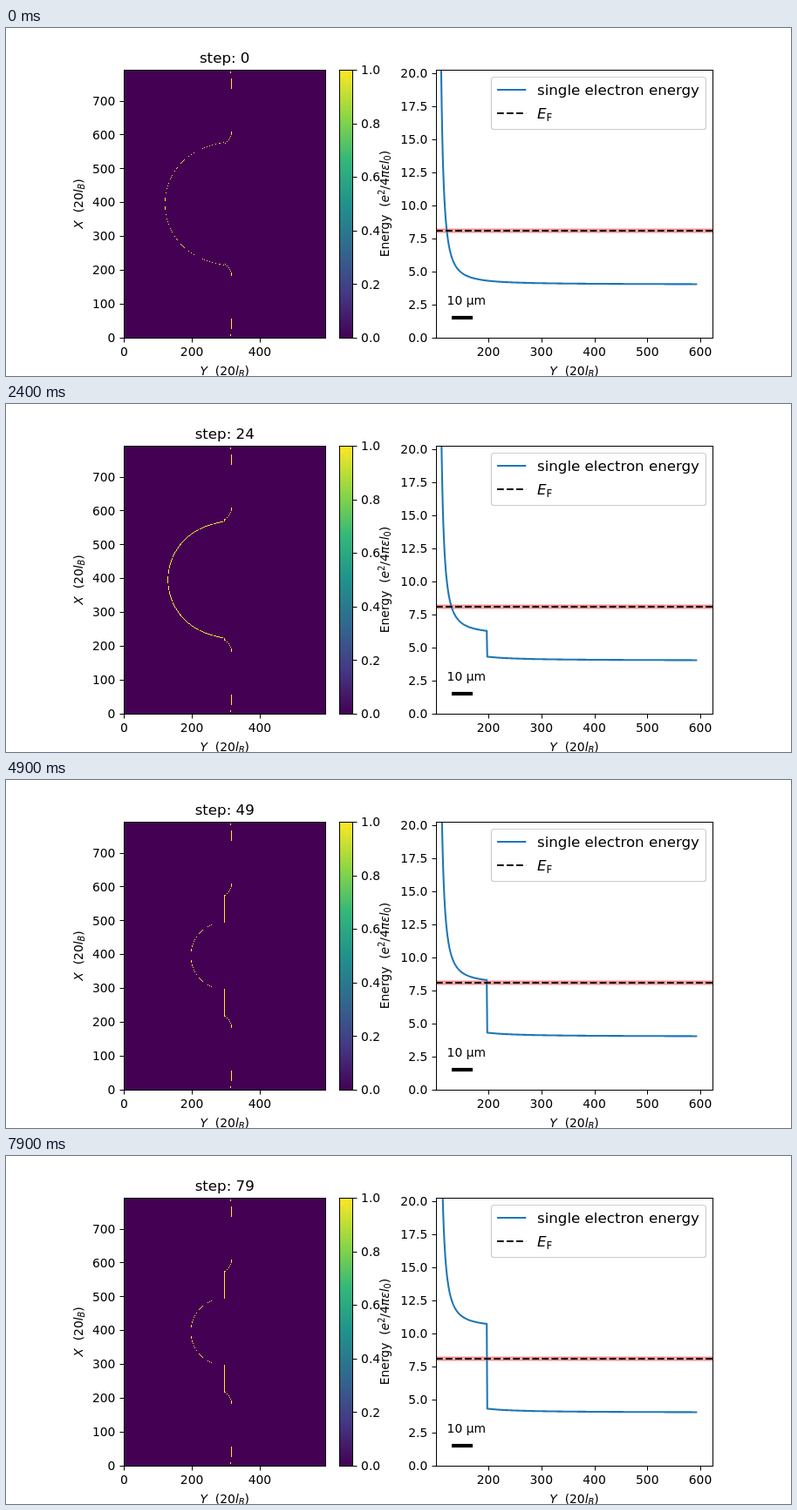
An HTML page with a canvas for the animation above (8000 ms loop, 900x400 px).

```html
<!DOCTYPE html>
<html lang="en">
<head>
<meta charset="utf-8">
<title>Energy contour</title>
<style>
  html, body { margin: 0; width: 100%; height: 100%; overflow: hidden; background: #fff; }
  canvas { position: absolute; left: 135px; top: 48px; }
  svg { position: absolute; left: 0; top: 0; }
  text { font: 13.89px "DejaVu Sans", sans-serif; white-space: pre; }
  .big { font-size: 16.67px; }
  .i { font-style: oblique; }
  .s { font-size: 70%; }
</style>
</head>
<body>
<canvas id="map" width="231" height="308"></canvas>
<svg id="plot" width="900" height="400" viewBox="0 0 900 400">
  <defs>
    <linearGradient id="viridis" x1="0" y1="1" x2="0" y2="0"></linearGradient>
    <clipPath id="clip"><rect x="493" y="48" width="317" height="308"/></clipPath>
  </defs>
</svg>
<script>
const STEPS = 80, STEP_MS = 100, GAIN = 0.081;
const FERMI = 8.08, HALF = 0.13;
const EDGE = 198, CX = 250.5, CY = 202, RADIUS = 38.5, SCALE = 308 / 792;
const svg = document.getElementById("plot");

function add(tag, attrs, html = "") {
  const el = document.createElementNS("http://www.w3.org/2000/svg", tag);
  for (const k in attrs) el.setAttribute(k, attrs[k]);
  el.innerHTML = html;
  svg.append(el);
  return el;
}
const label = (x, y, html, anchor = "middle", extra = {}) =>
  add("text", { x, y, "text-anchor": anchor, ...extra }, html);
const path = (d, width = 1, stroke = "#000", extra = {}) =>
  add("path", { d, fill: "none", stroke, "stroke-width": width, ...extra });
const frame = (x, y, w, h, fill = "none") =>
  add("rect", { x: x + 0.5, y: y + 0.5, width: w, height: h, fill, stroke: "#000" });

// Ticks sit on whole pixels, and so do the baselines of their labels.
const snap = v => Math.round(v) + 0.5;
const PAD = 9.72;
function xTick(x, text) {
  path(`M${snap(x)} 356.5v5`);
  label(x, 377, text);
}
function yTick(x, y, text, dir = -1) {
  path(`M${snap(x)} ${snap(y)}h${5 * dir}`);
  label(x + PAD * dir, Math.round(y + 5.2), text, dir < 0 ? "end" : "start");
}

// Energy of the unbiased state, falling off from the gate at Y = 101.3
function energy(u) {
  const q = Math.max(u - 101.3, 1);
  return 4.01 + 1382 / q ** 2 + 14.7 / q;
}

// Left axes
const title = label(250.7, 40, "", "middle", { class: "big" });
frame(135, 48, 231, 308);
for (let v = 0; v <= 400; v += 200) xTick(135.33 + v * SCALE, v);
for (let v = 0; v <= 700; v += 100) yTick(135.14, 355.8 - v * SCALE, v);
const unit = '\u00a0\u00a0(20<tspan class="i">l</tspan><tspan class="i s" dy="2.2">B</tspan><tspan dy="-2.2">)</tspan>';
const axisName = n => `<tspan class="i">${n}</tspan>${unit}`;
const turned = (x, html) => label(0, 0, html, "middle", { transform: `translate(${x} 202) rotate(-90)` });
label(250.7, 399, axisName("Y"));
turned(88, axisName("X"));

// Colour bar
document.getElementById("viridis").innerHTML =
  ["#440154", "#443983", "#31688e", "#21918c", "#35b779", "#90d743", "#fde725"]
    .map((c, i) => `<stop offset="${i / 6}" stop-color="${c}"/>`).join("");
frame(382, 48, 15, 308, "url(#viridis)");
for (let i = 0; i <= 5; i++) yTick(397.4, 356 - i * 61.6, (i / 5).toFixed(1), 1);

// Right axes
const px = u => 553 + (u - 200) * 0.6075;
const py = e => 356 - e * 15.22;
const BLUE = "#1f77b4", DASH = { "stroke-dasharray": "7.71 3.33" };
const clipped = { "clip-path": "url(#clip)" };
add("rect", { x: 493, y: py(FERMI + HALF), width: 317, height: 2 * HALF * 15.22,
  fill: "#f00", "fill-opacity": 0.3, stroke: "#f00", "stroke-opacity": 0.3,
  "stroke-width": 1.39, ...clipped });
const curve = path("", 2.08, BLUE, { ...clipped, "stroke-linejoin": "round" });
path("M493 233H810", 2.08, "#000", { ...DASH, ...clipped });
path("M511 333H535", 4.17);
label(527.8, 318, "10 μm");
frame(493, 48, 317, 308);
for (let v = 200; v <= 600; v += 100) xTick(px(v), v);
for (let v = 0; v <= 20; v += 2.5) yTick(492.95, py(v), v.toFixed(1));
label(651.5, 399, axisName("Y"));
turned(439, 'Energy\u00a0\u00a0(<tspan class="i">e</tspan><tspan class="s" dy="-5.3">2</tspan><tspan dy="5.3">/4</tspan>' +
  '<tspan class="i">πεl</tspan><tspan class="s" dy="2.2">0</tspan><tspan dy="-2.2">)</tspan>');

// Legend
add("rect", { x: 556.5, y: 56.5, width: 246, height: 60, rx: 3.3,
  fill: "#fff", "fill-opacity": 0.8, stroke: "#ccc", "stroke-width": 1.2 });
path("M563 71H596.3", 2.08, BLUE);
path("M563 98H596.3", 2.08, "#000", DASH);
label(609, 77, "single electron energy", "start", { class: "big" });
label(609, 104, '<tspan class="i">E</tspan><tspan class="s" dy="2.6">F</tspan>', "start", { class: "big" });

// Map
const ctx = document.getElementById("map").getContext("2d");
const dot = (x, y, h = 1) => ctx.fillRect(x - 135, y - 48, 1, h);
function pair(x, y, h = 1) {
  dot(x, y, h);
  dot(x, 2 * CY - y - h, h);
}

// Channel edge: a broken line at Y = 316 that bends in towards the gate.
function drawChannel() {
  pair(257, 50, 2);
  pair(258, 58, 12);
  for (let j = 0; j <= 13; j++) {
    if (j < 4 || j % 2) pair(Math.round(258 - 7 * (j / 13) ** 2), 119 + j);
  }
}

// Thin circular edge: only rows whose crossing falls mid-pixel show up.
function drawRim() {
  for (let dy = 0.5; dy < RADIUS - 1; dy++) {
    const x = CX - Math.sqrt(RADIUS ** 2 - dy ** 2), part = x % 1;
    if (part > 0.38 && part < 0.78) pair(Math.floor(x), CY - dy - 0.5);
  }
}

// Unbiased energy at every pixel outside the circle, left of the gate line.
const field = [];
for (let x = 178; x <= 250; x++) {
  for (let y = 128; y <= 275; y++) {
    const dx = CX - x - 0.5, dy = Math.abs(y + 0.5 - CY);
    const r = Math.hypot(dx, dy);
    if (r < RADIUS) continue;
    const flare = 2.5 * (1 - dx / r) ** 6;
    const u = 297 - Math.hypot(dx, dy - flare) / SCALE;
    field.push({ x, y, dy, e: energy(Math.min(u, EDGE)) });
  }
}

function drawMap(shift) {
  ctx.fillStyle = "#440154";
  ctx.fillRect(0, 0, 231, 308);
  ctx.fillStyle = "#fde725";
  drawChannel();
  const low = FERMI - HALF - shift, high = FERMI + HALF - shift;
  for (const { x, y, dy, e } of field) {
    const onLine = x === 250 && dy < 69.6;
    if (e > low && (e < high || onLine)) dot(x, y);
  }
  if (energy(EDGE) > low) drawRim();
}

function drawCurve(shift) {
  const pts = [];
  for (let u = 108; u <= 594; u++) {
    const e = energy(u) + (u < EDGE ? shift : 0);
    pts.push(px(u).toFixed(2) + " " + py(e).toFixed(2));
  }
  curve.setAttribute("d", "M" + pts.join("L"));
}

const start = performance.now();
let shown = -1;
function tick() {
  const step = Math.floor((performance.now() - start) / STEP_MS) % STEPS;
  if (step !== shown) {
    shown = step;
    title.textContent = "step: " + step;
    drawMap(step * GAIN);
    drawCurve(step * GAIN);
  }
  requestAnimationFrame(tick);
}
tick();
</script>
</body>
</html>
```
